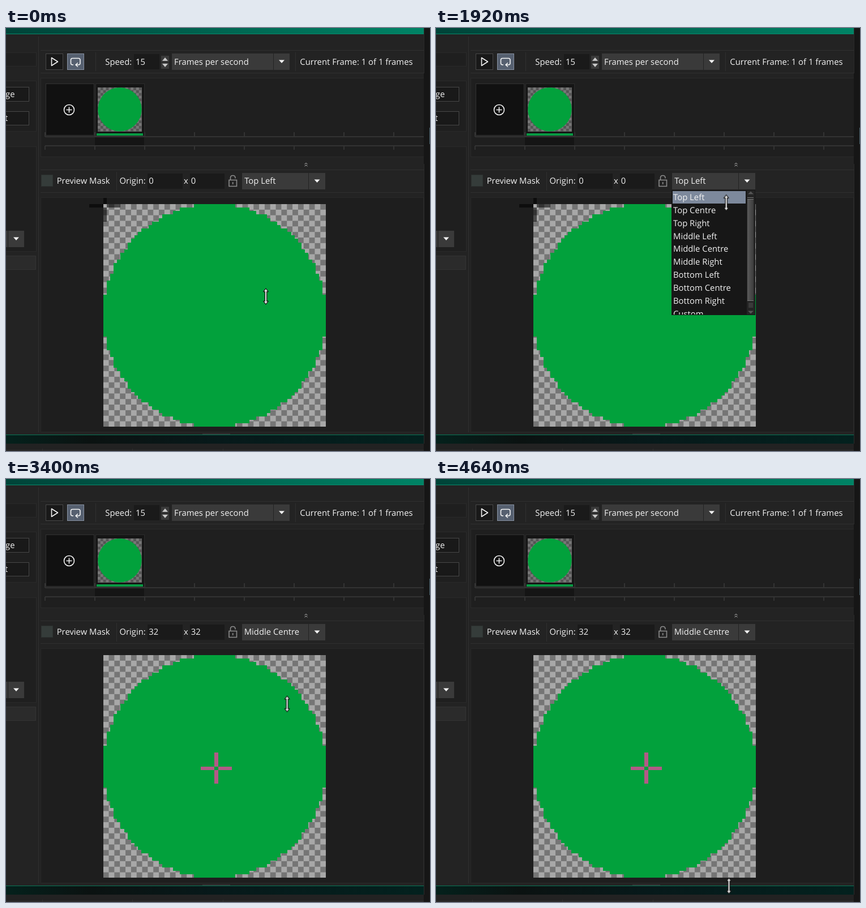
Animation of 749 by 747 pixels, one loop 4660 ms. Source, as an HTML page:

```html
<!DOCTYPE html>
<html lang="en">
<head>
<meta charset="utf-8">
<title>Sprite origin</title>
<style>
html, body { margin: 0; width: 100%; height: 100%; overflow: hidden; background: #232323; }
svg { display: block; }
text { font: 14.85px "Open Sans", "Noto Sans", sans-serif; fill: #f2f2f2; text-rendering: geometricPrecision; white-space: pre; }
rect, .crisp { shape-rendering: crispEdges; }
.line { fill: none; stroke: #303030; }
.panel { fill: #1f1f1f; stroke: #2a2a2a; }
.field { fill: #1a1a1a; }
.combo { fill: #3a3a3a; }
.button { fill: #191919; stroke: #474747; }
.icon { fill: none; stroke: #f4f4f4; stroke-width: 1.6; stroke-linejoin: round; }

.cursor, .menu, .hover, .before, .after { animation: 4660ms infinite; }
.cursor { animation-name: travel; animation-timing-function: linear; }
.menu, .hover, .before, .after { animation-timing-function: step-end; }
.menu { animation-name: menu; }
.hover { animation-name: hover; }
.before { animation-name: before; }
.after { animation-name: after; }

@keyframes travel {
  0%, 6.44% { transform: translate(459px, 474px); }
  6.44% { animation-timing-function: ease-in-out; }
  14.59% { transform: translate(518px, 264px); animation-timing-function: ease-in-out; }
  19.74%, 37.77% { transform: translate(522px, 283px); }
  48.93% { transform: translate(492px, 366px); animation-timing-function: ease-out; }
  54.51%, 72.96% { transform: translate(496.5px, 397px); }
  72.96% { animation-timing-function: ease-in-out; }
  91.42%, 93.56% { transform: translate(579.5px, 524px); }
  93.56% { animation-timing-function: ease-in; }
  95.71% { transform: translate(557px, 583px); animation-timing-function: ease-out; }
  99.57%, 100% { transform: translate(517.5px, 718.5px); }
}
@keyframes menu {
  0% { visibility: hidden; }
  22.75% { visibility: visible; }
  56.65%, 100% { visibility: hidden; }
}
@keyframes hover {
  0% { opacity: 0; transform: none; }
  40.26% { opacity: 1; transform: none; }
  43.33% { opacity: 1; transform: translateY(22.85px); }
  46.39% { opacity: 1; transform: translateY(45.7px); }
  49.57% { opacity: 1; transform: translateY(68.55px); }
  53.73%, 100% { opacity: 1; transform: translateY(91.4px); }
}
@keyframes before {
  0% { visibility: visible; }
  56.65%, 100% { visibility: hidden; }
}
@keyframes after {
  0% { visibility: hidden; }
  56.65%, 100% { visibility: visible; }
}
</style>
</head>
<body>
<svg width="749" height="747" viewBox="0 0 749 747">
  <defs>
    <linearGradient id="topBar">
      <stop offset="0" stop-color="#004338"/>
      <stop offset=".5" stop-color="#006450"/>
      <stop offset="1" stop-color="#008365"/>
    </linearGradient>
    <linearGradient id="bottomBar">
      <stop offset="0" stop-color="#04211c"/>
      <stop offset=".2" stop-color="#0b1211"/>
      <stop offset=".5" stop-color="#07191a"/>
      <stop offset="1" stop-color="#03211e"/>
    </linearGradient>
    <linearGradient id="thumb">
      <stop offset="0" stop-color="#5a5a5a"/>
      <stop offset="1" stop-color="#3c3c3c"/>
    </linearGradient>
    <pattern id="checker" width="19.67" height="19.67" patternUnits="userSpaceOnUse">
      <path class="crisp" fill="#757575" d="M0 0h19.67v19.67H0z"/>
      <path class="crisp" fill="#a8a8a8" d="M0 0h9.835v9.835H0zM9.835 9.835h9.835v9.835H9.835z"/>
    </pattern>
    <pattern id="smallChecker" width="9.7" height="9.7" patternUnits="userSpaceOnUse">
      <path fill="#555" d="M0 0h9.7v9.7H0z"/>
      <path fill="#777" d="M0 0h4.85v4.85H0zM4.85 4.85h4.85v4.85H4.85z"/>
    </pattern>
    <path id="disc" class="crisp" fill="#02a13c"/>
    <path id="down" d="M-5 -2.5H5L0 3z" fill="#f4f4f4"/>
    <clipPath id="view"><path d="M62 300H738V714H62z"/></clipPath>
    <clipPath id="list"><path d="M416 286H564V506H416z"/></clipPath>
  </defs>

  <!-- window frame -->
  <rect width="749" height="747" fill="#232323"/>
  <rect width="738" height="11" fill="url(#topBar)"/>
  <rect y="10" width="738" height="1" fill="#078a6c"/>
  <rect x="738" width="11" height="747" fill="#161616"/>
  <rect x="738" width="1" height="734" fill="#2b2b2b"/>
  <rect x="748" y="176" width="1" height="29" fill="#4c6570"/>

  <!-- left column -->
  <rect class="panel" x="-2.5" y="43.5" width="56" height="24"/>
  <rect class="panel" x="-2.5" y="93.5" width="56" height="89"/>
  <rect class="button" x="-2.5" y="104.5" width="43" height="25"/>
  <rect class="button" x="-2.5" y="147.5" width="43" height="24"/>
  <text x="-1" y="122">ge</text>
  <text x="-2" y="164">t</text>
  <rect class="panel" x="-2.5" y="209.5" width="56" height="185"/>
  <rect class="combo" width="3" height="29" y="358"/>
  <rect class="combo" x="4" y="358" width="28" height="29"/>
  <use href="#down" x="18" y="372"/>
  <rect x="-2.5" y="402.5" width="55" height="24" fill="#2b2b2b" stroke="#333"/>
  <path class="line crisp" d="M57.5 15V714"/>

  <!-- playback bar -->
  <path class="line crisp" d="M61 39.5H738M61 79.5H738M158.5 43V76M511.5 43V76"/>
  <rect class="button" x="70.5" y="45.5" width="30" height="28"/>
  <path class="icon" d="M80.500 52.500V66.500L91.500 59.500z"/>
  <rect x="108.500" y="45.500" width="29" height="28" fill="#566070" stroke="#8791a1"/>
  <path class="icon" stroke-width="2" d="M119 65H117.500Q114.500 65 114.500 62V56.500Q114.500 53.500 117.500 53.500H128Q131 53.500 131 56.500V62Q131 65 128 65H124M127 61.500L123 65L127 68.500"/>
  <text x="175.300" y="65">Speed:</text>
  <rect class="field" x="226" y="46" width="45" height="27"/>
  <text x="229" y="65">15</text>
  <rect class="combo" x="274" y="49" width="14" height="11"/>
  <rect class="combo" x="274" y="61" width="14" height="11"/>
  <path fill="#c8c8c8" d="M276 58H286L281 52zM276 63H286L281 69z"/>
  <rect class="combo" x="293" y="45" width="179" height="29"/>
  <rect class="combo" x="473" y="45" width="28" height="29"/>
  <use href="#down" x="487" y="59"/>
  <text x="297" y="65">Frames per second</text>
  <text x="519.300" y="65">Current Frame: 1 of 1 frames</text>

  <!-- timeline -->
  <rect class="panel" x="61.500" y="88.500" width="680" height="139"/>
  <rect x="738" y="80" width="11" height="160" fill="#161616"/>
  <rect x="748" y="176" width="1" height="29" fill="#4c6570"/>
  <rect x="157" y="192" width="87" height="15" fill="#151515"/>
  <path id="ticks" class="crisp" fill="none" stroke="#333" stroke-width="2"/>
  <rect x="70.500" y="98.500" width="85" height="91" fill="#111" stroke="#323232"/>
  <circle class="icon" cx="111.500" cy="144.500" r="9"/>
  <path class="icon" d="M106.500 144.500h10M111.500 139.500v10"/>
  <rect x="158.500" y="98.500" width="86" height="92" fill="#151515" stroke="#2c2c2c"/>
  <g transform="translate(162 105)">
    <rect width="78" height="77.500" fill="url(#smallChecker)"/>
    <circle cx="39" cy="38.700" r="38.700" fill="#02a13c"/>
  </g>
  <rect x="160" y="186" width="82" height="4" fill="#079a42"/>
  <path fill="none" stroke="#bbb" d="M527.500 240.500L530 238.500L532.500 240.500M527.500 244L530 242L532.500 244"/>

  <!-- origin bar -->
  <path class="line crisp" d="M61 250.500H738M61 290.500H738M195.500 254V287"/>
  <rect x="62.500" y="259.500" width="20" height="20" fill="#353c3a" stroke="#2e3331"/>
  <text x="89.700" y="275">Preview Mask</text>
  <text x="200.500" y="275">Origin:</text>
  <rect class="field" x="250" y="257" width="62" height="27"/>
  <text x="314" y="275">x</text>
  <rect class="field" x="325" y="257" width="61" height="27"/>
  <g fill="none" stroke="#8d8d8d" stroke-width="1.600">
    <path d="M394 268.500H407.500V279.500H394zM396.500 268V264.500Q396.500 260.500 400.700 260.500T405 264.500V265.500M400.700 272V276"/>
  </g>
  <rect class="combo" x="417" y="256" width="117" height="29"/>
  <rect class="combo" x="535" y="256" width="29" height="29"/>
  <use href="#down" x="549.500" y="270"/>
  <g class="before">
    <text x="252.200" y="275">0</text>
    <text x="326.700" y="275">0</text>
    <text x="421.200" y="275">Top Left</text>
  </g>
  <g class="after">
    <text x="252.200" y="275">32</text>
    <text x="326.700" y="275">32</text>
    <text x="420.700" y="275">Middle Centre</text>
  </g>

  <!-- sprite view -->
  <rect x="61.500" y="299.500" width="676" height="414" fill="#1e1e1e" stroke="#282828"/>
  <g clip-path="url(#view)">
    <g transform="translate(171.700 311)">
      <rect width="393.400" height="393.400" fill="url(#checker)"/>
      <use href="#disc" transform="scale(6.147)"/>
      <g class="crisp" transform="scale(6.147)">
        <g class="before">
          <path fill="#0d0d0d" d="M-4 0h4v1h-4zM0 -4h1v4h-1z"/>
          <path fill="#000" fill-opacity=".56" d="M1 0h4v1h-4zM0 1h1v4h-1z"/>
        </g>
        <path class="after" fill="#b25b86" d="M28 32h4v1h-4zM33 32h4v1h-4zM32 28h1v4h-1zM32 33h1v4h-1z"/>
      </g>
    </g>
  </g>

  <!-- bottom edge -->
  <rect x="347" y="716" width="49" height="2" fill="#343434"/>
  <rect y="718" width="738" height="1" fill="#087657"/>
  <rect y="719" width="738" height="15" fill="url(#bottomBar)"/>
  <rect y="734" width="738" height="13" fill="#222"/>
  <path class="line crisp" d="M0 745.500H738M64.500 743V747M223.500 743V747M383.500 743V747"/>

  <!-- drop-down list -->
  <g class="menu">
    <rect x="416" y="286" width="148" height="221" fill="#171717"/>
    <rect x="418" y="289" width="129" height="21" fill="#52606c"/>
    <rect class="hover" x="418" y="288" width="129" height="22" fill="#7d899c"/>
    <g id="items" clip-path="url(#list)"></g>
    <rect x="549" y="287" width="14" height="219" fill="#242424"/>
    <rect x="550" y="302" width="11" height="180" fill="url(#thumb)"/>
    <path class="crisp" stroke="#777" d="M550 299.500h11M550 302.500h11M550 481.500h11"/>
    <rect x="552" y="485" width="8" height="9" fill="#3a3a3a"/>
    <path fill="#555" d="M551 293.500H561L556 288.500zM551 499.500H561L556 504.500z"/>
  </g>

  <g class="cursor">
    <path d="M0 -14L4.300 -8.300H1.700V8.300H4.300L0 14L-4.300 8.300H-1.700V-8.300H-4.300z" fill="#e2e2e2" stroke="#151515" stroke-width="1.200" stroke-linejoin="round"/>
  </g>
</svg>
<script>
const byId = id => document.getElementById(id);

// Pixel disc on a 64 x 64 grid
let disc = '';
for (let y = 0; y < 64; y++) {
  const half = Math.floor(Math.sqrt(32 ** 2 - (y - 31.5) ** 2) + 0.5);
  disc += `M${32 - half} ${y}h${2 * half}v1h${-2 * half}z`;
}
byId('disc').setAttribute('d', disc);

let ticks = 'M69 192H738M69 208H738';
for (let x = 69; x < 738; x += 88) ticks += `M${x} 184v8M${x} 208v7`;
byId('ticks').setAttribute('d', ticks);

const rows = [];
for (const v of ['Top', 'Middle', 'Bottom'])
  for (const h of ['Left', 'Centre', 'Right']) rows.push(`${v} ${h}`);
rows.push('Custom');
byId('items').innerHTML = rows
  .map((name, i) => `<text x="419" y="${304 + i * 22.85}">${name}</text>`)
  .join('');
</script>
</body>
</html>
```
